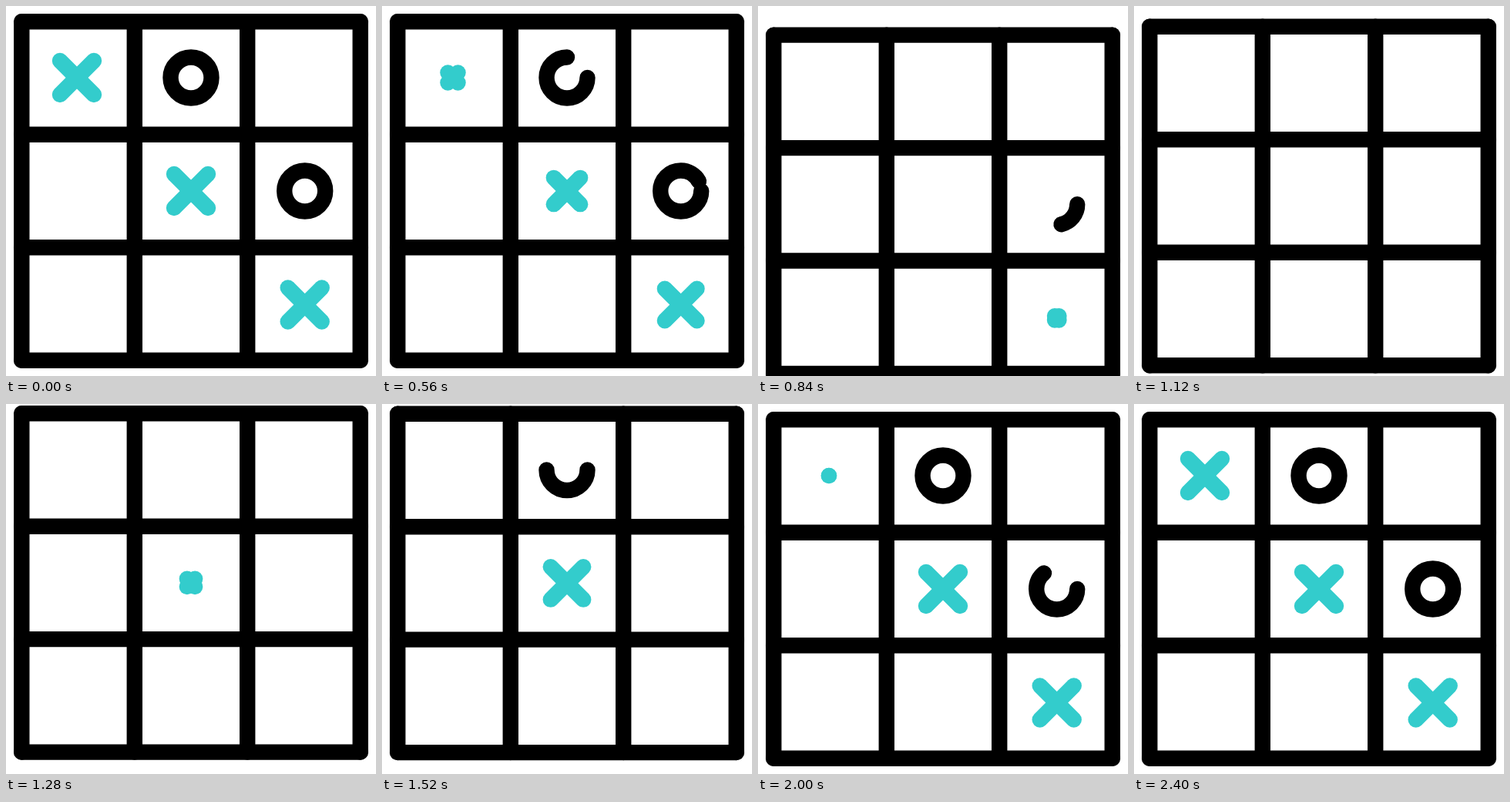
An HTML page with a canvas that plays this animation: 480 px wide and 480 px high, repeating every 2800 ms.

```html
<!DOCTYPE html>
<html>
<head>
<meta charset="utf-8">
<style>
html, body { margin: 0; height: 100%; overflow: hidden; background: #fff; }
canvas { display: block; }
</style>
</head>
<body>
<canvas id="stage" width="480" height="480"></canvas>
<script>
const ctx = document.getElementById('stage').getContext('2d');
const LOOP = 2800, STEP = 40;
const LINES = [20.3, 166.8, 313.2, 459.7];

// [time, value] keys: vertical bounce of the whole board
const BOUNCE = [[596, 0], [913, 20], [1366, -11], [1778, 0]];

// erase and draw hold [start, end] times
const MARKS = [
  { shape: cross, x: 92, y: 93, erase: [215, 755], draw: [1985, 2405] },
  { shape: ring, x: 240, y: 93, erase: [436, 816], draw: [1310, 1730] },
  { shape: cross, x: 240, y: 240, erase: [445, 825], draw: [1148, 1568] },
  { shape: ring, x: 387.7, y: 240, erase: [468, 999], draw: [1750, 2170] },
  { shape: cross, x: 387.7, y: 387.5, erase: [499, 936], draw: [1529, 1949] },
];

function ease(t, start, end) {
  const u = Math.min(1, Math.max(0, (t - start) / (end - start)));
  return u * u * (3 - 2 * u);
}

function bounce(t) {
  let y = 0;
  for (let i = 1; i < BOUNCE.length; i++) {
    const [t0, y0] = BOUNCE[i - 1], [t1, y1] = BOUNCE[i];
    y += (y1 - y0) * ease(t, t0, t1);
  }
  return y;
}

function line(x1, y1, x2, y2) {
  ctx.beginPath();
  ctx.moveTo(x1, y1);
  ctx.lineTo(x2, y2);
  ctx.stroke();
}

function cross(x, y, amount) {
  const h = 22 * amount;
  ctx.strokeStyle = '#33cccc';
  line(x - h, y - h, x + h, y + h);
  line(x - h, y + h, x + h, y - h);
}

function ring(x, y, amount) {
  ctx.strokeStyle = '#000';
  ctx.beginPath();
  ctx.arc(x, y, 26.5, 0, 2 * Math.PI * amount);
  ctx.stroke();
}

function board() {
  const a = LINES[0], b = LINES[3];
  ctx.strokeStyle = '#000';
  for (const p of LINES) {
    line(p, a, p, b);
    line(a, p, b, p);
  }
}

function render(now) {
  const t = Math.floor((now % LOOP) / STEP) * STEP;
  ctx.setTransform(1, 0, 0, 1, 0, 0);
  ctx.fillStyle = '#fff';
  ctx.fillRect(0, 0, 480, 480);
  ctx.translate(0, bounce(t));
  ctx.lineWidth = 20.4;
  ctx.lineCap = ctx.lineJoin = 'round';
  board();
  for (const { shape, x, y, erase, draw } of MARKS) {
    const amount = 1 - ease(t, ...erase) + ease(t, ...draw);
    if (amount > 0.001) shape(x, y, amount);
  }
}

const begin = performance.now();
function tick() {
  render(performance.now() - begin);
  requestAnimationFrame(tick);
}
tick();
</script>
</body>
</html>
```
